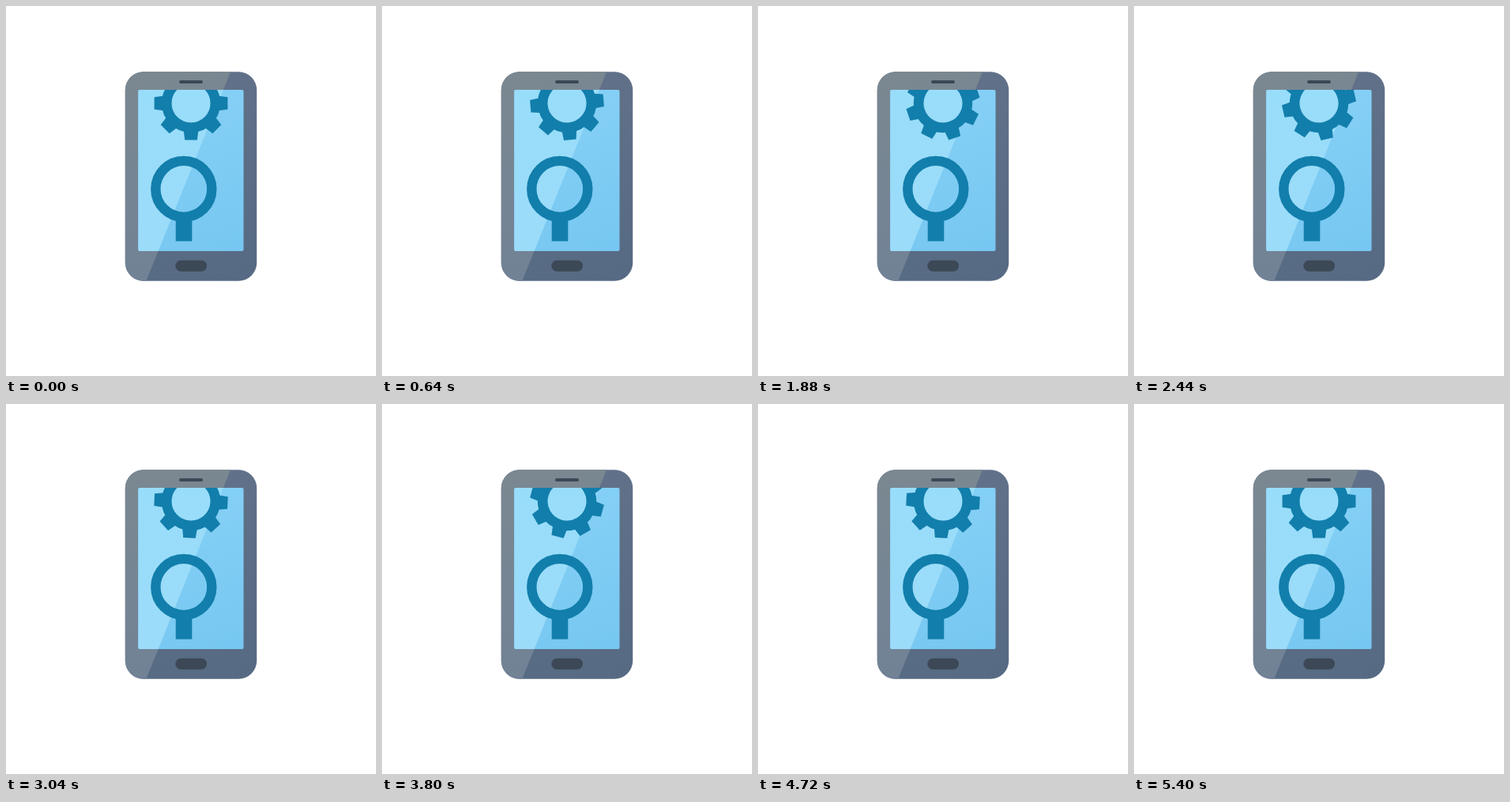
Recreate the animation shown at these times as an HTML page with a canvas. Size 468 by 468 pixels, loop 5440 ms.

```html
<!DOCTYPE html>
<html lang="en">
<head>
<meta charset="utf-8">
<title>Phone with turning gear</title>
<style>
  html, body { margin: 0; width: 100%; height: 100%; overflow: hidden; background: #fff; }
  canvas { display: block; width: 468px; height: 468px; }
</style>
</head>
<body>
<canvas id="stage" width="468" height="468"></canvas>
<script>
const ctx = document.getElementById('stage').getContext('2d');
const LOOP = 5440;
const INK = '#127eab';
const DARK = '#3c4856';

// Gear swing: time in ms, angle in degrees
const SWING = [[0, 0], [1940, -18.5], [3820, 15], [5080, 0], [LOOP, 0]];

const ease = u => u * u * (3 - 2 * u);

function swingAt(t) {
  for (let i = 1; i < SWING.length; i++) {
    const [t0, a0] = SWING[i - 1], [t1, a1] = SWING[i];
    if (t <= t1) return a0 + (a1 - a0) * ease((t - t0) / (t1 - t0));
  }
  return 0;
}

function blend(x0, y0, x1, y1, from, to) {
  const g = ctx.createLinearGradient(x0, y0, x1, y1);
  g.addColorStop(0, from);
  g.addColorStop(1, to);
  return g;
}

const bodyFill = blend(230, 83, 317, 348, '#62718a', '#566a83');
const bodyShine = blend(151, 83, 200, 348, '#7b8891', '#718296');
const glassFill = blend(240, 130, 300, 310, '#84cff5', '#76c7f1');
const glassShine = blend(167, 106, 200, 310, '#98ddfa', '#9bdcf9');

function panel(x, y, w, h, r) {
  const path = new Path2D();
  path.roundRect(x, y, w, h, r);
  return path;
}

const body = panel(150.8, 83.2, 166.4, 264.6, 23);
const glass = panel(167.3, 106, 133.2, 204, 2);
const speaker = panel(219, 94, 30, 4, 2);
const button = panel(214.3, 321.7, 39.8, 14, 7);

const shine = new Path2D('M0 0H317.6L0 0ZM140 70H289.3L172.4 360H140Z');

function shinyPanel(path, base, light) {
  ctx.save();
  ctx.fillStyle = base;
  ctx.fill(path);
  ctx.clip(path);
  ctx.fillStyle = light;
  ctx.fill(shine);
  ctx.restore();
}

function ring(x, y, r, width) {
  ctx.lineWidth = width;
  ctx.beginPath();
  ctx.arc(x, y, r, 0, Math.PI * 2);
  ctx.stroke();
}

function gear(angle) {
  ctx.save();
  ctx.clip(glass);
  ctx.translate(234, 123);
  ctx.rotate(angle * Math.PI / 180);
  ring(0, 0, 30.8, 12.6);
  for (let i = 0; i < 8; i++) {
    ctx.beginPath();
    ctx.moveTo(33, -9.3);
    ctx.lineTo(37, -9);
    ctx.lineTo(46.4, -7.8);
    ctx.lineTo(46.4, 7.8);
    ctx.lineTo(37, 9);
    ctx.lineTo(33, 9.3);
    ctx.fill();
    ctx.rotate(Math.PI / 4);
  }
  ctx.restore();
}

function draw(t) {
  ctx.fillStyle = '#fff';
  ctx.fillRect(0, 0, 468, 468);
  shinyPanel(body, bodyFill, bodyShine);
  shinyPanel(glass, glassFill, glassShine);
  ctx.fillStyle = DARK;
  ctx.fill(speaker);
  ctx.fill(button);
  ctx.fillStyle = ctx.strokeStyle = INK;
  gear(swingAt(t));
  ring(224.8, 231.4, 35.5, 12.4);
  ctx.fillRect(214.7, 268, 20.6, 29.5);
}

const start = performance.now();
function tick() {
  draw((performance.now() - start) % LOOP);
  requestAnimationFrame(tick);
}
tick();
</script>
</body>
</html>
```
